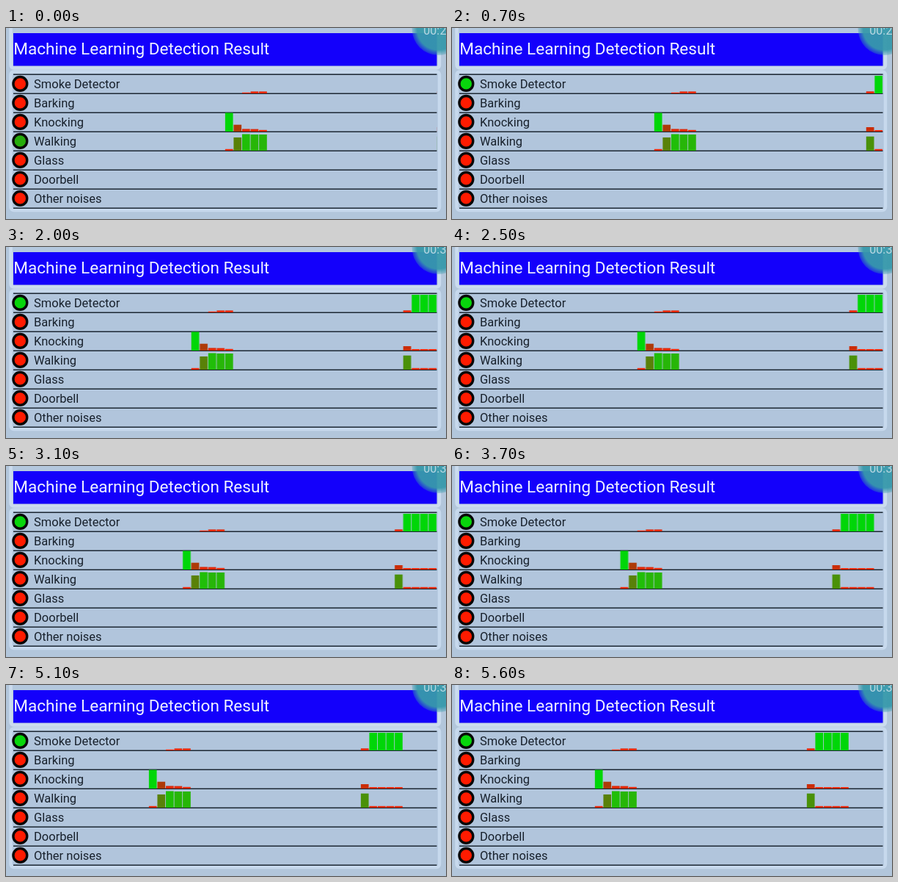
Write an HTML page that moves like this. It is 600 px wide and 260 px high and loops after 5.7 s.

```html
<!DOCTYPE html>
<html lang="en">
<head>
<meta charset="utf-8">
<title>Machine Learning Detection Result</title>
<style>
html, body { margin: 0; width: 100%; height: 100%; overflow: hidden; background: #b2c6db; }
svg { display: block; width: 600px; height: 260px; font-family: Roboto, sans-serif; }
.title { font-size: 22.57px; fill: #eef0ff; }
.label { font-size: 16.5px; fill: #18212c; }
.clock { font-size: 16px; fill: #b9d8e2; }
.line { stroke: #1d2834; stroke-width: 1.4; }
.led { fill: #ff1b00; stroke: #080808; stroke-width: 3.4; }
.strip, .smoke, .walking, .early, .late { animation: 5700ms step-end infinite; }
.strip { animation-name: shift; }
.smoke { animation-name: smoke; }
.walking { animation-name: walking; }
.early { animation-name: early; }
.late { animation-name: late; }
/* one history slot is 11.56px wide */
@keyframes shift {
  0% { transform: translateX(0); }
  1.754% { transform: translateX(-11.56px); }
  12.28% { transform: translateX(-23.12px); }
  22.807% { transform: translateX(-34.68px); }
  35.087% { transform: translateX(-46.24px); }
  45.614% { transform: translateX(-57.8px); }
  56.14% { transform: translateX(-69.36px); }
  66.666% { transform: translateX(-80.92px); }
  77.192% { transform: translateX(-92.48px); }
  89.473%, 100% { transform: translateX(-104.04px); }
}
@keyframes smoke { 0% { fill: #ff1b00; } 12.28%, 100% { fill: #08d60c; } }
@keyframes walking { 0% { fill: #26ac0c; } 1.754% { fill: #3fa008; } 12.28%, 100% { fill: #ff1b00; } }
@keyframes early { 0% { opacity: 1; } 35.087%, 100% { opacity: 0; } }
@keyframes late { 0% { opacity: 0; } 35.087%, 100% { opacity: 1; } }
</style>
</head>
<body>
<svg viewBox="0 0 600 260">
  <defs>
    <clipPath id="chart"><rect x="10" y="60" width="577.6" height="190"/></clipPath>
    <radialGradient id="badge">
      <stop offset=".8" stop-color="#3799ab" stop-opacity=".95"/>
      <stop offset="1" stop-color="#3799ab" stop-opacity=".3"/>
    </radialGradient>
  </defs>
  <rect width="600" height="260" fill="#b2c6db"/>
  <rect x="6.5" y="-8" width="584.5" height="62.5" rx="4" fill="#b4c8de" stroke="#cbdcee" stroke-width="4.5"/>
  <rect x="6.5" y="59.5" width="584.5" height="188.5" rx="4" fill="#b1c5dc" stroke="#c7d9ed" stroke-width="4.5"/>
  <rect x="10" y="7" width="577.5" height="44.5" fill="#1300fb"/>
  <text class="title" x="10.3" y="35.8">Machine Learning Detection Result</text>
  <g id="rows"></g>
  <g clip-path="url(#chart)"><g class="strip" id="strip"></g></g>
  <circle cx="589.5" cy="1" r="36" fill="url(#badge)"/>
  <text class="clock" x="569.3" y="8.8">00:</text>
  <text class="clock early" x="591.5" y="8.8">2</text>
  <text class="clock late" x="591.5" y="8.8">3</text>
</svg>
<script>
const TOP = 63, ROW = 26, SLOT = 11.56, NEWEST = 576.3;
const labels = ["Smoke Detector", "Barking", "Knocking", "Walking", "Glass", "Doorbell", "Other noises"];

// Bar heights per row; each burst starts at a slot relative to the newest one.
const bursts = [
  { start: -24, row: 0, heights: [0, 0, 1.2, 2.6, 2.6] },
  { start: -24, row: 2, heights: [25.5, 9.3, 3.6, 3.4, 2.2] },
  { start: -24, row: 3, heights: [2.2, 18, 22.5, 22, 22] },
  { start: 1, row: 0, heights: [2.7, 24, 24, 24, 24] },
  { start: 1, row: 2, heights: [6, 2, 2, 2, 2] },
  { start: 1, row: 3, heights: [19.3, 2.2, 2.2, 2.2, 2.2] }
];

function add(parent, name, attrs, text) {
  const node = document.createElementNS("http://www.w3.org/2000/svg", name);
  for (const key in attrs) node.setAttribute(key, attrs[key]);
  if (text) node.textContent = text;
  parent.append(node);
}

// Red for weak readings through olive to green for strong ones.
function barColor(height) {
  const v = Math.min(1, height / 24);
  return `rgb(${Math.round(252 * (1 - v) ** .75)}, ${Math.round(38 + 176 * v ** 2.3)}, 8)`;
}

const strip = document.getElementById("strip");
for (const { start, row, heights } of bursts) {
  heights.forEach((height, i) => {
    if (!height) return;
    add(strip, "rect", {
      x: NEWEST + (start + i) * SLOT,
      y: TOP + (row + 1) * ROW - height,
      width: 10.7, height, fill: barColor(height)
    });
  });
}

const rows = document.getElementById("rows");
const ledClass = { 0: "led smoke", 3: "led walking" };
for (let i = 0; i <= labels.length; i++) {
  const y = TOP + i * ROW;
  add(rows, "line", { class: "line", x1: 10, x2: 587.5, y1: y + .2, y2: y + .2 });
  if (i === labels.length) break;
  add(rows, "circle", { class: ledClass[i] || "led", cx: 19.3, cy: y + 12.9, r: 9.4 });
  add(rows, "text", { class: "label", x: 38, y: y + 19.3 }, labels[i]);
}
</script>
</body>
</html>
```
